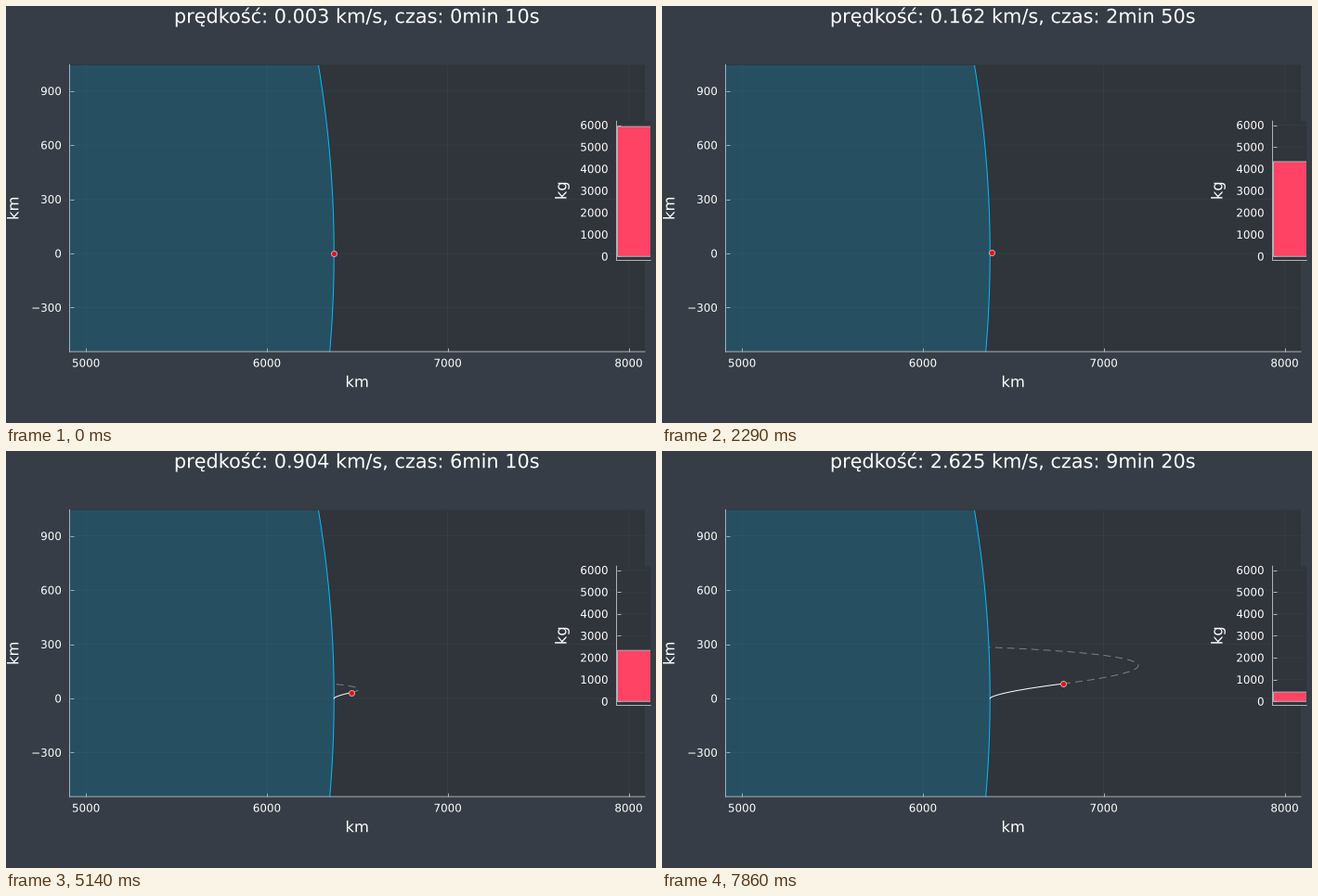
Animation of 700x450 px, one loop 8000 ms. Source, as a matplotlib script:

```python
import numpy as np
import matplotlib.pyplot as plt
from matplotlib.animation import FuncAnimation
from matplotlib.patches import PathPatch, Rectangle
from matplotlib.textpath import TextPath
from matplotlib.transforms import Affine2D

W, H, DPI = 700, 450, 100
PX = 72 / DPI                      # one pixel in points
STEPS, LOOP, TICK_MS = 56, 8000, 40
LEAD_MS = 33                       # a step shows on the tick just before it is due

BACK, INSIDE, LINE = "#363D46", "#30343B", "#ADB2B7"
SKY, FUEL_RED = "#00BFFF", "#FE4365"
TITLE, LABEL, SMALL = 20.83, 16.37, 11.9

plt.rcParams["font.family"] = "DejaVu Sans"
plt.rcParams["path.snap"] = False

# Flight model: km, s, kg
R, MU = 6371.0, 398600.0
TANK, MASS, BURN = 6000, 10000, 10
THRUST = np.array([9.74e-3, 0.43e-3]) * MASS
DELAY = 3                          # the clock runs ahead of the engine

# Speed readings along the climb, joined by one smooth polynomial
READ_T = np.array([0, 7, 117, 227, 307, 427, 507, 557]) / 557
READ_V = [0, 0.00295, 0.079, 0.311, 0.601, 1.304, 2.029, 2.625]
SPEED = np.polyfit(READ_T, READ_V, 7)


def gravity(pos):
    return -MU * pos / np.hypot(*pos) ** 3


def move(pos, vel, acc, dt):
    return pos + vel * dt + acc * dt * dt / 2, vel + acc * dt


def climb(seconds):
    pos, vel = np.array([R, 0.0]), np.zeros(2)
    path, vels = [pos], [vel]
    for t in range(seconds):
        acc = THRUST / (MASS - BURN * (t + 0.5)) + gravity(pos)
        pos, vel = move(pos, vel, acc, 1)
        path.append(pos)
        vels.append(vel)
    return np.array(path), np.array(vels)


def fall(pos, vel, dt=2):
    """Unpowered arc from the given state back to the ground."""
    arc = [pos]
    while np.hypot(*pos) >= R and len(arc) < 1000:
        mid = pos + vel * dt / 2
        pos, vel = move(pos, vel, gravity(mid), dt)
        arc.append(pos)
    return np.array(arc)


def engine_time(step):
    return 10 * (step + 1) - DELAY


path, vels = climb(engine_time(STEPS - 1))
arcs = [fall(path[engine_time(i)], vels[engine_time(i)]) for i in range(STEPS)]

fig = plt.figure(figsize=(W / DPI, H / DPI), dpi=DPI, facecolor=BACK)


def add_axes(left, top, right, bottom):
    ax = fig.add_axes([left / W, 1 - bottom / H, (right - left) / W, (bottom - top) / H],
                      facecolor=INSIDE)
    ax.spines[["top", "right"]].set_visible(False)
    for side in ("left", "bottom"):
        ax.spines[side].set(color=LINE, linewidth=PX)
    ax.tick_params(direction="in", length=4 * PX, width=PX, color=LINE,
                   labelleft=False, labelbottom=False)
    ax.set_axisbelow(True)
    return ax


def outline(text, size, align=0.5):
    """Text outline on its baseline; align 0.5 centres it, 1 ends it at x = 0."""
    shape = TextPath((0, 0), text, size=size)
    box = shape.get_extents()
    return shape.transformed(Affine2D().translate(-box.x0 - align * box.width, 0))


def label(x, y, text, size, align=0.5, angle=0):
    place = Affine2D().rotate_deg(angle).translate(x, H - y).scale(1 / DPI)
    return fig.add_artist(PathPatch(outline(text, size, align), facecolor="white",
                                    linewidth=0, transform=place + fig.dpi_scale_trans))


def side_labels(x, zero, scale, values):
    for v in values:
        text = str(v).replace("-", "\u2212")
        label(x, zero - v * scale + 0.3645 * SMALL, text, SMALL, align=1)


# Map with the planet's edge
SCALE = 0.19478                    # pixels per km
xs, ys = range(5000, 8001, 1000), range(-300, 901, 300)
view = add_axes(68.5, 63.5, 688, 373)
view.set_xlim(5000 - 17.7 / SCALE, 5000 + 601.8 / SCALE)
view.set_ylim(-106 / SCALE, 203.5 / SCALE)
view.set_xticks(xs)
view.set_yticks(ys)
view.grid(color=LINE, alpha=0.1, linewidth=0.5 * PX)
side_labels(59.1, 267, SCALE, ys)
for x in xs:
    label(86.2 + (x - 5000) * SCALE, 389.4, str(x), SMALL)

angle = np.linspace(-0.15, 0.25, 400)
edge_x, edge_y = R * np.cos(angle), R * np.sin(angle)
view.fill_betweenx(edge_y, 4000, edge_x, color=SKY, alpha=0.2, linewidth=0)
view.plot(edge_x, edge_y, color=SKY, linewidth=PX)

ahead, = view.plot([], [], color="gray", linewidth=PX, linestyle=(0, (8, 5)),
                   dash_capstyle="butt")
trail, = view.plot([], [], color="white", linewidth=PX)
ship, = view.plot([], [], "o", color="red", markersize=6 * PX,
                  markeredgecolor=LINE, markeredgewidth=PX, zorder=5)

# Fuel gauge
kilos = range(0, TANK + 1, 1000)
gauge = add_axes(657.5, 124.25, 694.2, 274.5)
gauge.set_xlim(0, 36.7)
gauge.set_ylim(-180, 6180)
gauge.set_xticks([])
gauge.set_yticks(kilos)
gauge.grid(axis="y", color=LINE, alpha=0.1, linewidth=0.5 * PX)
side_labels(647.8, 270.25, 150.25 / 6360, kilos)
fuel = gauge.add_patch(Rectangle((1, 0), 60, TANK, facecolor=FUEL_RED,
                                 edgecolor=LINE, linewidth=PX, zorder=3))

label(378.2, 411.2, "km", LABEL)
label(13.4, 218.2, "km", LABEL, angle=90)
label(603.5, 199.2, "kg", LABEL, angle=90)
title = label(378.2, 18.2, "km", TITLE)


def update(tick):
    step = (tick * TICK_MS + LEAD_MS) * STEPS // LOOP
    t = engine_time(step)
    minutes, seconds = divmod(t + DELAY, 60)
    speed = np.polyval(SPEED, t / 557)
    text = f"prędkość: {speed:.3f} km/s, czas: {minutes}min {seconds}s"
    title.set_path(outline(text, TITLE))
    trail.set_data(*path[:t + 1].T)
    ahead.set_data(*arcs[step].T)
    ship.set_data(*path[t:t + 1].T)
    fuel.set_height(TANK - BURN * t)
    return title, trail, ahead, ship, fuel


anim = FuncAnimation(fig, update, frames=LOOP // TICK_MS, init_func=lambda: update(0),
                     interval=TICK_MS, repeat=True, repeat_delay=0)
plt.show()
```
